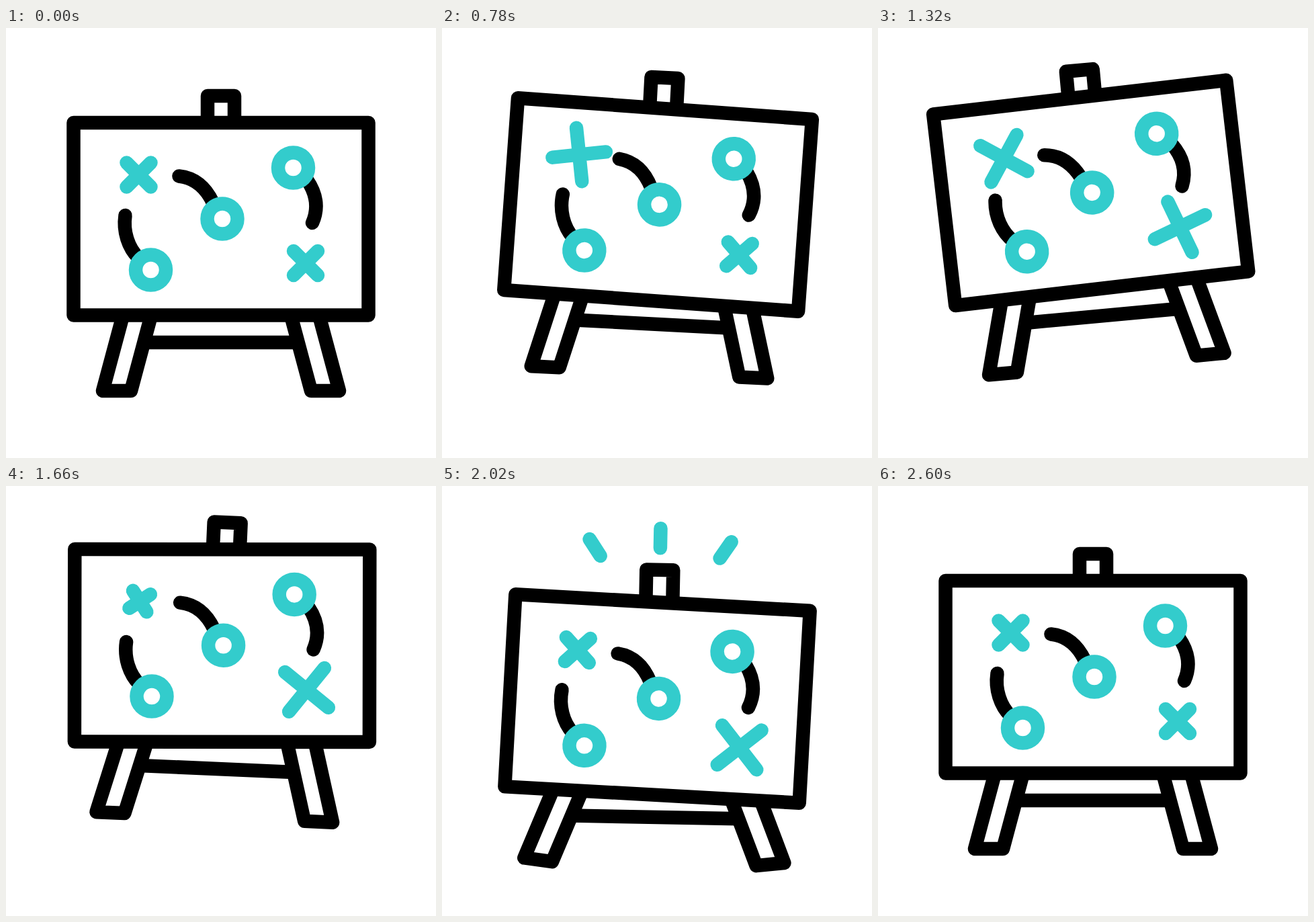
An HTML page that plays this animation: 640 px wide and 640 px high, repeating every 3 s.

```html
<!DOCTYPE html>
<html lang="en">
<head>
<meta charset="utf-8">
<title>Strategy board</title>
<style>
  html, body { margin: 0; width: 100%; height: 100%; overflow: hidden; background: #fff; }
  svg { display: block; width: 100vw; height: 100vh; }
  path, circle, rect { stroke: #000; stroke-width: 20.5; stroke-linecap: round; stroke-linejoin: round; fill: none; }
  .solid { fill: #fff; }
  .teal { stroke: #3cc; }
</style>
</head>
<body>
<svg viewBox="0 0 640 640">
  <defs>
    <path id="leg" class="solid" d="M181.5 400 L144 540 H186 L223.5 400"/>
    <circle id="ring" class="teal solid" r="22.5"/>
  </defs>
  <g id="easel">
    <path id="bar"/>
    <use id="legL" href="#leg"/>
    <use id="legR" href="#leg"/>
    <path class="solid" d="M300 165 V101 H340 V165"/>
    <path id="sparks" class="teal"/>
    <g id="board">
      <rect class="solid" x="100.5" y="141" width="439" height="286.5"/>
      <path d="M257.5 220.5 Q291 224 308 260"/>
      <path d="M177.5 279 C174 303 182 327 197 342"/>
      <path d="M456 290 Q470 258 448 226"/>
      <use href="#ring" x="322" y="284"/>
      <use href="#ring" x="215.5" y="360"/>
      <use href="#ring" x="427.5" y="208"/>
      <path id="crossA" class="teal"/>
      <path id="crossB" class="teal"/>
    </g>
  </g>
</svg>
<script>
const LOOP = 3000, STEP = 20;
let now = 0;

const $ = id => document.getElementById(id);
const place = (id, value) => $(id).setAttribute("transform", value);
const shape = (id, d) => $(id).setAttribute("d", d);

// Progress from 0 to 1 between two times: linear, smooth, and there-and-back.
const linear = (a, b) => Math.min(1, Math.max(0, (now - a) / (b - a)));
const ramp = (a, b) => { const x = linear(a, b); return x * x * (3 - 2 * x); };
const bump = (a, peak, b) => ramp(a, peak) - ramp(peak, b);

// Crouch, leap, rise a little further, land and recover.
const lift = () => 28 * ramp(220, 490) - 67 * ramp(490, 885) - 8 * ramp(1320, 1690)
  + 77 * ramp(1690, 2090) - 30 * ramp(2090, 2440);

// Rock right, left, right and back to rest; the board's own tilt trails behind.
const sway = () => 6 * ramp(635, 925) - 12 * ramp(925, 1388)
  + 12 * ramp(1388, 1810) - 6 * ramp(1810, 2100);
const tilt = () => 6 * ramp(666, 1072) - 12 * ramp(1072, 1504)
  + 9.5 * ramp(1504, 1880) - 3.5 * ramp(1880, 2200);
const drop = () => 12 * bump(220, 560, 1000) + 9 * bump(1640, 2080, 2560);

// A cross grows, shrinks past its rest size, and turns past a quarter circle before settling.
function drawCross(id, x, y, { grow, gain, shrink, turn, span }) {
  const size = 1 + gain * ramp(grow, grow + 385) - (gain + 0.28) * ramp(shrink, shrink + 300)
    + 0.28 * ramp(shrink + 300, shrink + 560);
  const end = turn + span;
  const spin = 107 * (linear(turn, end) + ramp(turn, end)) / 2 - 17 * ramp(end, end + 240);
  const r = 18 * size;
  shape(id, `M${-r} ${-r}L${r} ${r}M${r} ${-r}L${-r} ${r}`);
  place(id, `translate(${x} ${y}) rotate(${spin})`);
}

// The legs splay about their hidden tops and carry the ends of the bar.
function drawLegs(spread) {
  const turn = `rotate(${spread} 190 388)`;
  place("legL", turn);
  place("legR", "translate(640 0) scale(-1 1) " + turn);
  const a = spread * Math.PI / 180, c = Math.cos(a), s = Math.sin(a);
  const x = 190 + 15 * c - 80 * s, y = 388 + 15 * s + 80 * c;
  shape("bar", `M${x} ${y}H${640 - x}`);
}

// Three rays shoot out; each tail chases its head.
function drawSparks() {
  const head = 1 - (1 - linear(1950, 2240)) ** 2;
  const tail = linear(2050, 2340) ** 1.5;
  let d = "";
  for (const side of [-1, 0, 1]) {
    const at = k => `${320 + side * (89 + 39 * k)} ${68.5 - 68.5 * k + Math.abs(side) * (13.5 + 10.5 * k)}`;
    d += `M${at(tail)}L${at(head)}`;
  }
  shape("sparks", head > 0 && tail < 1 ? d : "");
}

function draw() {
  const y = lift();
  place("easel", `translate(0 ${y}) rotate(${sway()} 320 320)`);
  place("board", `translate(0 ${drop()}) rotate(${tilt()} 320 284)`);
  drawLegs(0.285 * Math.max(0, y));
  drawCross("crossA", 197.5, 218.5, { grow: 220, gain: 0.57, shrink: 1320, turn: 220, span: 1560 });
  drawCross("crossB", 446, 350, { grow: 950, gain: 0.64, shrink: 2040, turn: 1105, span: 750 });
  drawSparks();
}

const start = performance.now();
function tick() {
  now = Math.floor((performance.now() - start) % LOOP / STEP) * STEP;
  draw();
  requestAnimationFrame(tick);
}
tick();
</script>
</body>
</html>
```
